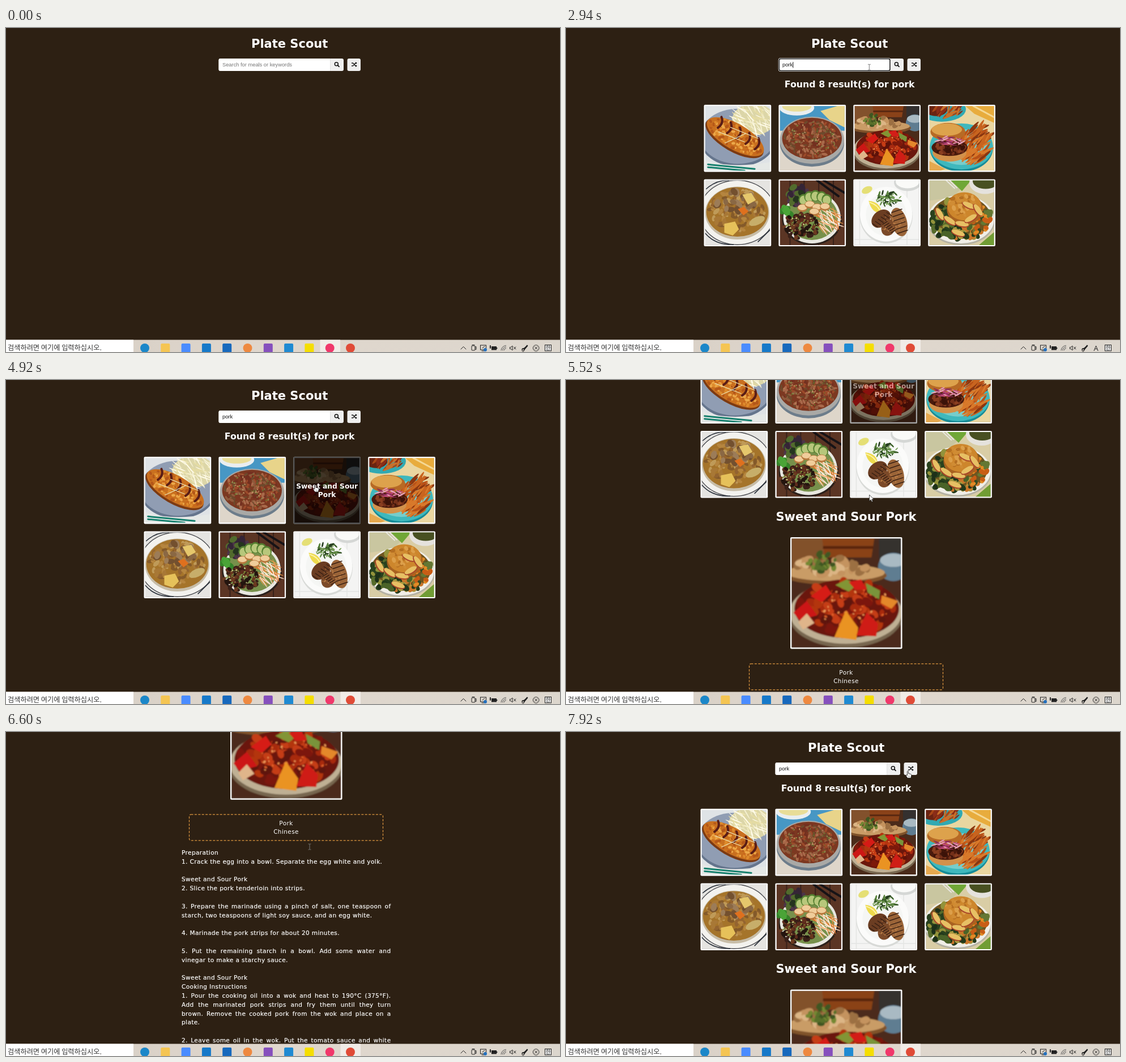
Write an HTML page that moves like this. It is 978 px wide and 573 px high and loops after 8 s.

```html
<!DOCTYPE html>
<html lang="en">
<head>
<meta charset="utf-8">
<title>Plate Scout</title>
<style>
html, body { margin: 0; width: 100%; height: 100%; overflow: hidden; background: #2d2013; }
svg { display: block; width: 978px; height: 573px; }
.bold { font-family: "DejaVu Sans", Verdana, sans-serif; font-weight: 700; fill: #fff; text-anchor: middle; }
.body { font: 10.5px "DejaVu Sans", Verdana, sans-serif; letter-spacing: .4px; fill: #fff; color: #fff; -webkit-text-stroke: .2px #fff; }
.line { height: 15.82px; line-height: 15.82px; }
.just { text-align: justify; text-align-last: justify; }
.field { font: 9.3px "Liberation Sans", Arial, sans-serif; }
.kr { font-family: "Noto Sans CJK KR", "Noto Sans CJK", sans-serif; fill: #333; }
</style>
</head>
<body>
<svg id="stage" viewBox="0 0 978 573"></svg>
<script>
const stage = document.getElementById('stage');
const LOOP = 8000, TICK = 60;

// ---- drawing helpers ----
const rect = (x, y, w, h, fill, more = '') => `<rect x="${x}" y="${y}" width="${w}" height="${h}" fill="${fill}" ${more}/>`;
const oval = (x, y, rx, ry, fill, more = '') => `<ellipse cx="${x}" cy="${y}" rx="${rx}" ry="${ry}" fill="${fill}" ${more}/>`;
const path = (d, fill, more = '') => `<path d="${d}" fill="${fill}" ${more}/>`;
const line = (d, color, w, more = '') => path(d, 'none', `stroke="${color}" stroke-width="${w}" stroke-linecap="round" ${more}`);
const label = (x, y, size, s, more = '') => `<text class="bold" x="${x}" y="${y}" font-size="${size}" ${more}>${s}</text>`;
const turn = (deg, x, y) => `transform="rotate(${deg} ${x} ${y})"`;

function rng(seed) {
  return () => (seed = (seed * 16807) % 2147483647) / 2147483647;
}

// random morsels or strands inside an ellipse, turned between two angles
function scatter(seed, n, cx, cy, rx, ry, colors, size, flat = .7, from = 0, to = 180) {
  const rnd = rng(seed * 7919 + 13);
  rnd();
  let out = '';
  for (let i = 0; i < n; i++) {
    const a = rnd() * 6.283, r = Math.sqrt(rnd());
    const x = (cx + rx * r * Math.cos(a)).toFixed(1), y = (cy + ry * r * Math.sin(a)).toFixed(1);
    const s = size * (.6 + .6 * rnd());
    out += oval(x, y, s.toFixed(1), (s * flat).toFixed(1), colors[i % colors.length], turn(Math.round(from + rnd() * (to - from)), x, y));
  }
  return out;
}

// ---- dishes, each in a 115 x 115 box ----
const dishes = [
  () => rect(0, 0, 115, 115, '#dfe3e6') + oval(58, 58, 68, 50, '#65758d') + oval(58, 54, 67, 49, '#909db3')
    + oval(86, 24, 38, 28, '#dcd6a8') + scatter(3, 70, 86, 25, 35, 26, ['#f4efcf', '#e7dda2', '#fffbe8'], 12, .08, 10, 80)
    + `<g ${turn(30, 54, 56)}>` + oval(53, 58, 58, 24, '#7c3a12') + oval(53, 55, 57, 23, '#c9701f')
    + scatter(5, 150, 53, 55, 52, 20, ['#de8b2c', '#b45719', '#eca748', '#c9691d'], 3.4)
    + [14, 33, 52, 71, 90].map(x => line(`M${x} 37q10 8 4 20`, '#5a1d16', 4)).join('') + '</g>'
    + line('M24 46L70 64M45 38L94 58M35 66L72 49', '#eadfb0', 1.2)
    + path('M0 96Q45 112 115 100V115H0Z', '#e5e8e6')
    + line('M5 104L88 112M5 109L70 115', '#16806e', 3),

  () => rect(0, 0, 115, 115, '#ded6ca') + rect(0, 0, 115, 44, '#4797c4')
    + oval(30, 3, 31, 14, '#e9eef0') + oval(30, 1, 26, 9, '#e8dd98') + path('M72 9L102 0H115V38L88 25Z', '#e8d48a')
    + oval(57, 66, 57, 42, '#6d7d8b') + oval(57, 61, 57, 42, '#a9a9a6') + oval(57, 58, 53, 37, '#7c3821')
    + scatter(11, 190, 57, 58, 49, 33, ['#9c4a2a', '#733020', '#a9694a', '#8f5a3c', '#6d4a2c'], 5, .45)
    + scatter(12, 90, 57, 57, 45, 29, ['#66702a', '#c19a68', '#8c8a4c'], 1.4),

  () => rect(0, 0, 115, 115, '#4b2b1a') + rect(0, 0, 38, 32, '#82512c') + path('M32 0H87L84 20H35Z', '#8a4219')
    + rect(33, 8, 53, 3, '#5a2811') + rect(92, 0, 23, 22, '#34302f')
    + oval(107, 30, 16, 15, '#5f7d91') + oval(107, 23, 14, 7, '#a9bac3')
    + oval(46, 39, 54, 10, '#80532b') + oval(46, 36, 52, 9, '#c99c66')
    + scatter(21, 34, 46, 29, 42, 8, ['#c4935e', '#dcb585', '#9c6f42'], 6.5)
    + scatter(22, 26, 32, 25, 15, 10, ['#58702a', '#3f5621', '#748833'], 3.5)
    + oval(57, 81, 60, 34, '#77664f') + oval(57, 78, 59, 33, '#bfb094') + oval(58, 74, 55, 31, '#6b170c')
    + scatter(23, 110, 59, 72, 50, 26, ['#a82a10', '#c53c15', '#7c190b', '#b3350f', '#5f1209'], 6)
    + scatter(24, 45, 59, 70, 46, 22, ['#e0622a', '#ef9a58'], 1.5)
    + path('M20 61L36 49 42 58 32 67Z', '#d61b16') + path('M2 78L16 66 27 81 8 86Z', '#cc1715')
    + path('M46 49L58 43 69 49 60 56Z', '#829534') + path('M78 47L93 55 92 64 80 57Z', '#79943a')
    + path('M7 88L16 79 24 89 12 96Z', '#dfb58a') + path('M95 60L112 66 105 74 94 68Z', '#e4882c')
    + path('M57 76L70 94 68 107 45 104Z', '#ea9322') + path('M79 78L91 90 89 103 68 102Z', '#cf1d16')
    + path('M60 46L73 43 79 54 67 54Z', '#d31d18'),

  () => rect(0, 0, 115, 115, '#ead6a0') + path('M64 0H115V30L80 14Z', '#e8ac3d') + line('M78 0L115 20', '#f5d894', 3)
    + oval(22, 6, 43, 22, '#31a9b2') + oval(12, 6, 20, 12, '#6a2412')
    + scatter(31, 30, 34, 6, 24, 14, ['#a84716', '#c9702a', '#8a2d18'], 10, .22, 100, 160)
    + path('M0 98L28 112 20 115H0Z', '#e6a94f')
    + oval(57, 75, 56, 42, '#178c98') + oval(57, 72, 56, 41, '#3fb8bd') + oval(57, 73, 46, 32, '#77cdcb')
    + scatter(32, 75, 82, 68, 24, 34, ['#b95117', '#d9792a', '#8a3610', '#c8641f'], 15, .16, 105, 160)
    + oval(36, 83, 30, 16, '#d2914b') + oval(36, 74, 32, 15, '#4a1a0d')
    + scatter(33, 50, 36, 75, 28, 11, ['#74301a', '#3c1309', '#8a3e20'], 4)
    + oval(33, 46, 31, 16, '#b76a25') + oval(31, 42, 27, 11, '#dda24c')
    + scatter(34, 40, 38, 62, 24, 8, ['#c24c78', '#e5a4b7', '#8a2c58'], 7, .16, -30, 40),

  () => rect(0, 0, 115, 115, '#e5e4e1') + oval(57, 57, 68, 58, '#4a4b50') + oval(57, 57, 66.5, 56.5, '#f3f2ee')
    + line('M2 15Q20 -1 42 0M0 94Q18 115 50 114M94 109L115 88', '#29303a', 1.6)
    + oval(57, 58, 57, 47, '#c7bda8') + oval(57, 56, 55, 44, '#a5742a')
    + scatter(41, 130, 57, 53, 48, 37, ['#946430', '#b5853f', '#845a2a', '#a87836', '#bf9a58'], 6, .55)
    + scatter(42, 24, 55, 38, 36, 20, ['#73502f', '#8a6844', '#9c7c58'], 7)
    + path('M34 77L53 73 60 87 49 98 34 93Z', '#e6c15a') + path('M66 25L82 22 90 35 76 43Z', '#e5c76c')
    + path('M58 51L69 47 77 55 68 62Z', '#df701e') + oval(92, 72, 15, 7, '#c7ae6a', turn(-25, 92, 72)),

  () => rect(0, 0, 115, 115, '#5b3524') + [17, 42, 68, 94].map(x => rect(x, 0, 2, 115, '#38211a')).join('')
    + line('M66 0L104 28M78 0L115 22', '#171316', 4)
    + oval(57, 70, 53, 45, '#2b201b') + oval(57, 66, 51, 46, '#e8e7e0') + oval(57, 65, 46, 41, '#77904b')
    + scatter(51, 40, 33, 26, 20, 18, ['#352536', '#4d3548', '#25341f', '#526b2d'], 7)
    + scatter(52, 8, 10, 54, 10, 8, ['#36832a', '#4aa437'], 8)
    + [[42, 34], [52, 29], [63, 27], [74, 29], [83, 34]].map(([x, y]) => oval(x, y, 9, 10, '#557f30') + oval(x, y + 1, 7, 8, '#b7c77b')).join('')
    + scatter(53, 60, 84, 68, 20, 21, ['#ed9a4a', '#f6dfcb', '#e5742b', '#fff0df'], 14, .06, 15, 75)
    + [[40, 49], [53, 43], [66, 48], [80, 47], [61, 56]].map(([x, y]) => oval(x, y, 9, 7, '#b8783d') + oval(x, y - 1, 8, 5, '#f0cd9a')).join('')
    + scatter(54, 110, 38, 82, 31, 23, ['#3a2018', '#5d2c1d', '#24150f', '#6b3a20'], 4.5)
    + scatter(55, 34, 38, 78, 27, 18, ['#7d9a3b', '#c2cc82'], 1.6),

  () => rect(0, 0, 115, 115, '#f4f4f3') + line('M9 0V115M0 105H115M93 15V115', '#e4e5e3', 1.5)
    + oval(94, 4, 24, 15, '#d5d7d5') + oval(94, 2, 21, 12, '#fafaf8') + oval(22, 17, 10, 6, '#e5df75', turn(-25, 22, 17))
    + oval(56, 63, 47, 49, '#d8dad7') + oval(56, 60, 46.5, 48.5, '#fbfbfa') + oval(56, 61, 36, 38, '#f5f6f4')
    + scatter(61, 60, 60, 32, 22, 12, ['#3b6127', '#263d20', '#5e8742', '#7ca15c'], 4.5, .3)
    + path('M25 36Q48 39 47 58Q30 58 25 36Z', '#edda4d') + line('M27 39Q42 44 46 56', '#fff4ad', 2)
    + oval(47, 68, 19, 14, '#6b3d22', turn(-40, 47, 68)) + oval(79, 74, 14, 26, '#9a6438', turn(-15, 79, 74))
    + oval(60, 84, 12, 15, '#7c4a29', turn(25, 60, 84))
    + scatter(62, 44, 66, 75, 24, 16, ['#b67a45', '#9c6336'], 2.2, .5)
    + [0, 1, 2, 3, 4, 5].map(i => line(`M${32 + i * 5} ${77 - i * 4}l9 6M${66 + i * 2} ${57 + i * 7.5}l18 -6M${50 + i * 3} ${78 + i * 3}l8 -5`, '#3a2114', 1.5)).join(''),

  () => rect(0, 0, 115, 115, '#d9cda5') + path('M0 0H70L42 30 0 36Z', '#c9c6a0') + path('M38 0H74L58 19Z', '#70a736')
    + line('M30 0L45 14M36 0L49 13', '#e8e6df', 2) + oval(99, 4, 28, 20, '#e5e2dd') + oval(100, 1, 23, 14, '#485021')
    + path('M88 115L115 92V115Z', '#719d34')
    + oval(56, 72, 60, 43, '#b5b2a4') + oval(56, 69, 59, 43, '#f0eee7') + oval(56, 66, 53, 38, '#6f5520')
    + scatter(71, 70, 28, 68, 25, 33, ['#29411e', '#566b2b', '#1d3019', '#93933b'], 7)
    + scatter(74, 34, 58, 92, 34, 11, ['#22391a', '#4a6328', '#a89a40', '#c9762a'], 7)
    + scatter(72, 40, 92, 70, 16, 28, ['#c85d16', '#344a22', '#e28b25', '#647733'], 7)
    + oval(63, 51, 32, 28, '#a86220') + oval(62, 46, 30, 25, '#cd862c')
    + scatter(73, 40, 61, 43, 24, 19, ['#dc9f4a', '#b56f22', '#d08c34'], 5)
    + [[18, 60, 60], [36, 72, 35], [58, 78, 10], [74, 68, -30], [70, 45, 25], [86, 53, 55], [51, 94, 20]]
      .map(([x, y, a]) => oval(x, y, 13, 5.5, '#a8442a', turn(a, x, y)) + oval(x, y - 1, 12, 4.5, '#e7c064', turn(a, x, y))).join('')
];

// ---- page ----
const CARD = 118.7;
const cardPos = i => [243.5 + 131.9 * (i % 4), 135.7 + 131.7 * Math.floor(i / 4)];
const photo = (i, x, y, size) => rect(x, y, size, size, '#fff', 'rx="2"')
  + `<use href="#dish${i}" x="${x + 2.2}" y="${y + 2.2}" width="${size - 4.4}" height="${size - 4.4}"/>`;

function shade(i, lines) {
  const [x, y] = cardPos(i), first = y + 64 - (lines.length - 1) * 7.3;
  return `<g id="shade${i}">` + rect(x, y, CARD, CARD, '#000', 'rx="2" fill-opacity=".7"')
    + lines.map((s, n) => label(x + CARD / 2, first + n * 14.6, 12.25, s)).join('') + '</g>';
}

// a trailing "|" marks a justified line
const recipe = `Preparation
1. Crack the egg into a bowl. Separate the egg white and yolk.

Sweet and Sour Pork
2. Slice the pork tenderloin into strips.

3. Prepare the marinade using a pinch of salt, one teaspoon of|
starch, two teaspoons of light soy sauce, and an egg white.

4. Marinade the pork strips for about 20 minutes.

5. Put the remaining starch in a bowl. Add some water and|
vinegar to make a starchy sauce.

Sweet and Sour Pork
Cooking Instructions
1. Pour the cooking oil into a wok and heat to 190°C (375°F).|
Add the marinated pork strips and fry them until they turn|
brown. Remove the cooked pork from the wok and place on a|
plate.

2. Leave some oil in the wok. Put the tomato sauce and white|
sugar into the wok, and heat until the oil and sauce are fully|
combined.

3. Add some water to the wok and thoroughly heat the sweet|
and sour sauce before adding the pork strips to it.

4. Pour in the starchy sauce. Stir-fry all the ingredients until the|
pork and sauce are thoroughly mixed together.

5. Serve on a plate and add some coriander for decoration.`
  .split('\n').map(s => `<div class="line${s.endsWith('|') ? ' just' : ''}">${s.replace('|', '')}</div>`).join('');

const searchBar =
  rect(375.5, 54, 220.5, 22, '#efefef', 'rx="3"')
  + path('M378.5 54H572V76H378.5a3 3 0 0 1 -3 -3V57a3 3 0 0 1 3 -3Z', '#fff') + rect(572, 54, .7, 22, '#ddd')
  + rect(602.5, 54, 23.5, 22, '#efefef', 'rx="3"')
  + `<g id="ring">${rect(374.8, 53, 198.5, 24, '#fff', 'rx="4"')}${rect(376.3, 54.5, 195.6, 21, '#fff', 'rx="2.5" stroke="#111" stroke-width="1.5"')}</g>`
  + '<text id="query" class="field" x="382" y="68"></text>' + rect(0, 60, .9, 10.5, '#000', 'id="caret"')
  + `<circle cx="583.3" cy="63.7" r="3" fill="none" stroke="#111" stroke-width="1.5"/>` + line('M585.6 66L588 68.4', '#111', 1.8)
  + line('M610.5 62H612C614.5 62 615 67 617.5 67H618.5M610.5 67H612C614.5 67 615 62 617.5 62H618.5', '#111', 1.3)
  + path('M617 59.9L619.8 62 617 64.1ZM617 64.9L619.8 67 617 69.1Z', '#111');

const results = '<g id="results">' + label(500.7, 105, 15.8, 'Found 8 result(s) for pork')
  + dishes.map((d, i) => photo(i, ...cardPos(i), CARD)).join('')
  + shade(1, ['Pork Cassoulet']) + shade(2, ['Sweet and Sour', 'Pork']) + '</g>';

const meal = '<g id="meal">' + label(500.5, 426, 21, 'Sweet and Sour Pork') + photo(2, 402, 455.5, 197.5)
  + rect(329.5, 679.3, 342, 46, 'none', 'rx="3" stroke="#dd963f" stroke-width="1.2" stroke-dasharray="4 2.4"')
  + '<g class="body" text-anchor="middle"><text x="500.5" y="698">Pork</text><text x="500.5" y="713.7">Chinese</text></g>'
  + `<foreignObject x="316" y="739" width="369.5" height="520"><div class="body">${recipe}</div></foreignObject></g>`;

// ---- taskbar ----
const apps = ['#1b87c9o', '#f5c552', '#4a8cff', '#1679c9', '#1769bd', '#ee8940o', '#8650bd', '#1f8ad2', '#f5de00', '#f0386bo', '#e04b37o'];
const appIcon = (c, i) => {
  const x = 245 + 36.3 * i, color = c.slice(0, 7);
  return c.endsWith('o') ? oval(x, 566, 8, 8, color) : rect(x - 8, 558, 16, 16, color, 'rx="2"');
};
const INK = '#222';
const tray = line('M803 568L807.5 563.5 812 568', INK, 1)
  + rect(822, 562, 6, 8, 'none', `rx="1" stroke="${INK}"`) + line('M823 560.5H827M828 564.5L830 563.5V568.5L828 567.5', INK, 1)
  + rect(837.5, 561, 10, 8, 'none', `stroke="${INK}"`) + line('M840 571H844M841 566L845 563', INK, 1) + oval(846, 569, 3, 3, '#2470bd')
  + rect(857, 563, 9, 6.5, INK) + rect(866, 565, 1.3, 2.5, INK) + line('M855 562V566', INK, 2)
  + line('M874 570A9 9 0 0 1 882.5 561.5M876.5 570A6.5 6.5 0 0 1 882.5 564M879 570A4 4 0 0 1 882.5 566.5', '#555', 1)
  + path('M889.5 564.5H891.5L894 562V570L891.5 567.5H889.5Z', 'none', `stroke="${INK}"`) + line('M896.5 564L900 568M900 564L896.5 568', INK, 1)
  + line('M911 570.5Q914 573 915 569Q913 565 911 568T920 562', INK, 1.2) + line('M915 568L920 562', INK, 2.6)
  + `<g id="imeOff"><circle cx="935.7" cy="566" r="5.3" fill="none" stroke="${INK}" stroke-width=".9"/>${line('M933.5 563.8L937.9 568.2M937.9 563.8L933.5 568.2', INK, 1)}</g>`
  + `<text id="imeOn" x="935.5" y="570.5" font-family="Open Sans, sans-serif" font-size="13" text-anchor="middle" fill="${INK}">A</text>`
  + rect(951.5, 560.5, 11, 10.5, '#eee', `stroke="${INK}"`) + '<text class="kr" x="957" y="569.3" font-size="9.5" text-anchor="middle">한</text>';

const taskbar = rect(0, 551.5, 978, 22, 'url(#bar)') + rect(0, 551.5, 225, 22, '#fff')
  + '<text class="kr" x="3" y="569.5" font-size="12.2">검색하려면 여기에 입력하십시오.</text>'
  + rect(0, 551.5, 35.5, 22, '#f1ece7', 'id="active"') + apps.map(appIcon).join('') + tray;

// ---- pointers, hot spot at 0,0 ----
const pointers = {
  arrow: path('M0 0V11L2.6 8.7 4.3 12.4 6 11.6 4.4 8.1H7.8Z', '#fff', 'stroke="#111" stroke-width=".7"'),
  hand: path('M-1 1Q0 -.8 1.1 1V5L5.2 6Q6.6 6.5 6.3 8.3L5.3 13H-.6L-3.6 8.4Q-3.4 6.6 -1 8Z', '#fff', 'stroke="#111" stroke-width=".8"')
    + line('M1.2 9V11.5M3.2 9V11.5', '#555', .5),
  beam: line('M-2 -5H-.6L0 -4.4 .6 -5H2M0 -4.4V4.4M-2 5H-.6L0 4.4 .6 5H2', '#777', 1)
};

// a slight blur gives the dishes the softness of photographs
stage.innerHTML = '<defs><linearGradient id="bar"><stop offset=".2" stop-color="#d9d1c7"/><stop offset=".5" stop-color="#e0d7cd"/><stop offset="1" stop-color="#dcd6cd"/></linearGradient>'
  + '<filter id="soft"><feGaussianBlur stdDeviation=".6"/></filter>'
  + dishes.map((d, i) => `<symbol id="dish${i}" viewBox="0 0 115 115">${rect(0, 0, 115, 115, '#888')}<g filter="url(#soft)">${d()}</g></symbol>`).join('') + '</defs>'
  + rect(0, 0, 978, 573, '#2d2013')
  + `<g id="page">${label(500.7, 35, 21, 'Plate Scout')}${searchBar}${results}${meal}</g>` + taskbar
  + '<g id="mouse">' + Object.keys(pointers).map(k => `<g id="${k}">${pointers[k]}</g>`).join('') + '</g>';

// ---- timeline ----
const mouseKeys = [
  [60, 876, 35, 'arrow'], [300, 690, 47, 'arrow'], [420, 606, 55, 'hand'], [480, 560, 60, 'beam'], [540, 541, 62, 'beam'],
  [2880, 541, 62, 'beam'], [3060, 524, 84, 'arrow'], [3180, 488, 120, 'arrow'], [3240, 478, 140, 'hand'],
  [3600, 444, 177, 'hand'], [3720, 446, 178, 'hand'], [3840, 500, 182, 'hand'], [3960, 546, 185, 'hand'],
  [4980, 546, 185, 'hand'], [5280, 535.5, 203, 'hand'], [5460, 535.5, 203, 'arrow'], [6120, 536, 203, 'beam'],
  [7320, 536, 203, 'beam'], [7380, 538, 196, 'hand'], [7560, 563, 140, 'hand'], [7620, 573, 122, 'arrow'],
  [7800, 599, 82, 'arrow'], [7860, 602, 73, 'hand'], [7920, 603.5, 68.5, 'hand']
];
const scrollKeys = [
  [5400, 0], [5460, 45], [5580, 310], [5700, 430], [5880, 430], [5940, 540], [6000, 701], [6060, 732], [6120, 740],
  [6420, 740], [6480, 700], [6660, 450], [6780, 365], [6900, 365], [6960, 350], [7020, 280], [7080, 80], [7140, 0]
];
const caretFlips = [720, 1200, 1560, 2460, 2940, 3480, 3960, 4440];

function at(keys, t) {
  const n = keys.findIndex(k => k[0] > t);
  if (n === 0) return keys[0];
  const a = keys[n < 0 ? keys.length - 1 : n - 1], b = n < 0 ? a : keys[n];
  const f = a === b ? 0 : (t - a[0]) / (b[0] - a[0]);
  return a.map((v, i) => typeof v === 'number' ? v + (b[i] - v) * f : v);
}

const el = {};
stage.querySelectorAll('g[id], text[id], rect[id]').forEach(e => el[e.id] = e);
const show = (id, on) => el[id].setAttribute('display', on ? 'inline' : 'none');

function draw(ms) {
  const t = Math.floor(ms / TICK) * TICK;
  const fade = start => Math.min(1, Math.max(0, (t - start + TICK) / (4 * TICK)));
  const focused = t >= 720 && t < 4440, loaded = t >= 5040;

  const typed = 'pork'.slice(0, [1560, 1740, 1800, 1920].filter(k => t >= k).length);
  el.query.textContent = typed || 'Search for meals or keywords';
  el.query.setAttribute('fill', typed ? '#111' : '#757575');
  el.caret.setAttribute('x', typed ? 382.3 + el.query.getComputedTextLength() : 382);
  show('caret', caretFlips.filter(k => t >= k).length % 2);
  show('ring', focused);

  show('results', t >= 2580);
  show('meal', loaded);
  el.shade1.setAttribute('opacity', fade(3240) - fade(3780));
  el.shade2.setAttribute('opacity', fade(3780) - fade(5460) + fade(7380) - fade(7560));
  el.page.setAttribute('transform', `translate(${loaded ? -6 : 0} ${-at(scrollKeys, t)[1]})`);

  el.active.setAttribute('x', t < 720 ? 554.5 : 590.5);
  const ime = t >= 780 && t < 4800;
  show('imeOn', ime);
  show('imeOff', !ime);

  const [, x, y, kind] = at(mouseKeys, t);
  show('mouse', t >= 60);
  el.mouse.setAttribute('transform', `translate(${x} ${y})`);
  for (const k in pointers) show(k, k === kind);
}

const start = performance.now();
function loop() {
  draw((performance.now() - start) % LOOP);
  requestAnimationFrame(loop);
}
loop();
</script>
</body>
</html>
```
